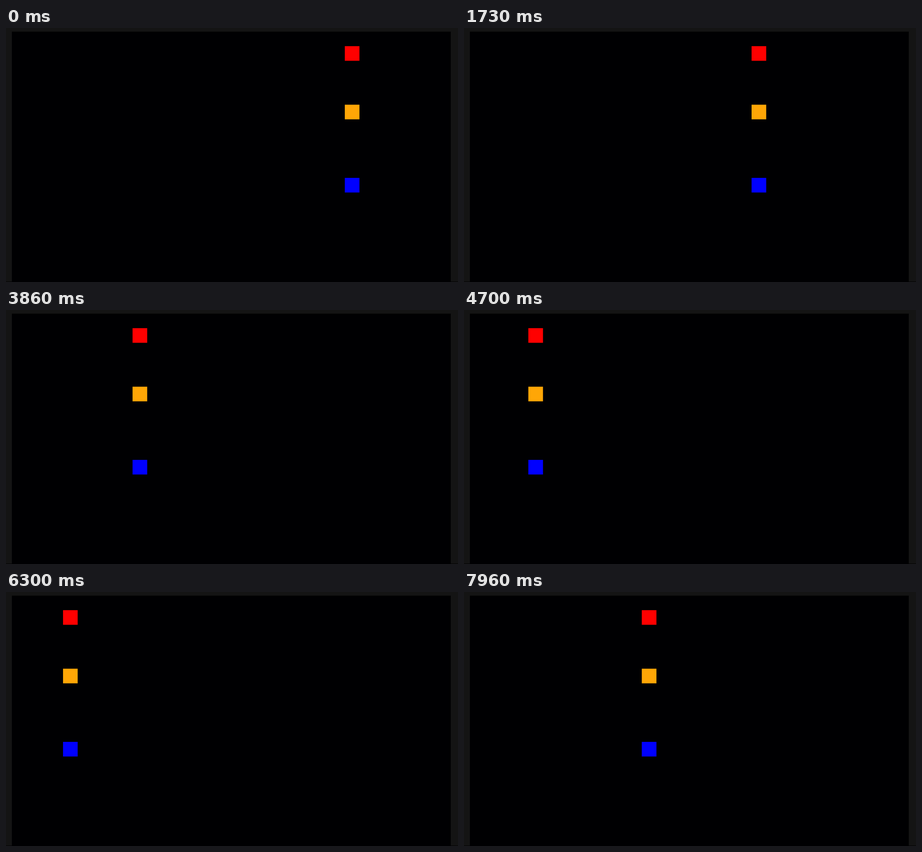
Animation, 998 px wide and 561 px high, one loop 8000 ms. Source, as an HTML page with a canvas:

```html
<!DOCTYPE html>
<html lang="en">
<head>
<meta charset="utf-8">
<title>Bouncing squares</title>
<style>
  html, body { margin: 0; width: 100%; height: 100%; overflow: hidden; background: #141414; }
  canvas { display: block; }
</style>
</head>
<body>
<canvas id="stage" width="998" height="561"></canvas>
<script>
const ctx = document.getElementById('stage').getContext('2d');
const LOOP = 8000;
const TICK = 49.48;
const SCALE = 1.616;
const BOARD = { x: 13, y: 8, width: 969, height: 553 };
const SIZE = 20, STRIDE = 5;
const FIRST = -1, LAST = 101, START = 91;
const SQUARES = [['#ff0000', 20], ['#ffa606', 100], ['#0000ff', 200]];

// Triangle wave between FIRST and LAST, moving right from START
function cellAt(tick) {
  const span = LAST - FIRST;
  const phase = (tick + START - FIRST + span) % (2 * span);
  return FIRST + Math.abs(phase - span);
}

function draw(ms) {
  ctx.fillStyle = '#141414';
  ctx.fillRect(0, 0, 998, 561);
  ctx.fillStyle = '#000002';
  ctx.fillRect(BOARD.x, BOARD.y, BOARD.width, BOARD.height);
  ctx.fillRect(0, 560, 998, 1);

  ctx.save();
  ctx.beginPath();
  ctx.rect(BOARD.x, BOARD.y, BOARD.width, BOARD.height);
  ctx.clip();
  ctx.translate(BOARD.x - 0.2, BOARD.y - 0.2);
  ctx.scale(SCALE, SCALE);
  ctx.filter = 'blur(0.6px)';
  const x = cellAt(Math.floor(ms / TICK)) * STRIDE;
  for (const [color, y] of SQUARES) {
    ctx.fillStyle = color;
    ctx.fillRect(x, y, SIZE, SIZE);
  }
  ctx.restore();
}

const start = performance.now();
function frame() {
  draw((performance.now() - start) % LOOP);
  requestAnimationFrame(frame);
}
frame();
</script>
</body>
</html>
```
